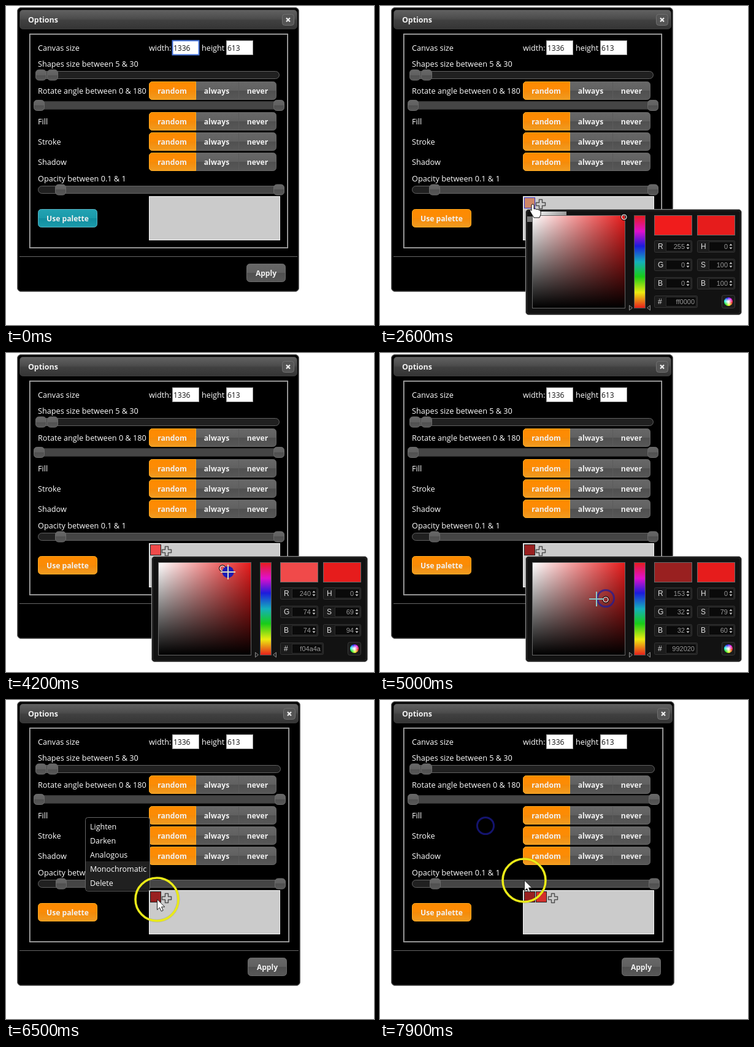
Animation, 600 px wide and 520 px high, one loop 8000 ms. Source, as an HTML page:

```html
<!DOCTYPE html>
<html lang="en">
<head>
<meta charset="utf-8">
<title>Options</title>
<style>
html, body { margin: 0; width: 600px; height: 520px; overflow: hidden; background: #fff; }
svg { display: block; }
text { font: 12.7px "Open Sans", "Noto Sans", sans-serif; fill: #fff; }
text.b { font-weight: 700; font-size: 12.1px; fill: #f2f2f2; }
text.mid { text-anchor: middle; }
text.in { font-size: 12px; fill: #111; }
text.menu { font-size: 12.5px; }
text.key { font: 12px "Liberation Sans", Arial, sans-serif; fill: #ddd; }
text.val { font: 11px "Liberation Sans", Arial, sans-serif; fill: #999; text-anchor: end; }
</style>
</head>
<body>
<svg width="600" height="520" viewBox="0 0 600 520">
  <defs id="defs"></defs>
  <g id="stage"></g>
</svg>
<script>
const LOOP = 8000, STEP = 100;
const stage = document.getElementById('stage');

// Gradients: name, horizontal?, then [offset, colour, opacity] stops
const grad = (id, horizontal, ...stops) =>
  `<linearGradient id="${id}" x1="0" y1="0" x2="${horizontal ? 1 : 0}" y2="${horizontal ? 0 : 1}">` +
  stops.map(([o, c, a = 1]) => `<stop offset="${o}" stop-color="${c}" stop-opacity="${a}"/>`).join('') +
  '</linearGradient>';
document.getElementById('defs').innerHTML =
  grad('bar', false, [0, '#626262'], [.45, '#4c4c4c'], [.55, '#404040'], [1, '#353535']) +
  grad('grey', false, [0, '#686868'], [.5, '#606060'], [.5, '#505050'], [1, '#585858']) +
  grad('orange', false, [0, '#ff8a00'], [.5, '#fb8c06'], [.5, '#f58a08'], [1, '#f19c22']) +
  grad('teal', false, [0, '#22a2b2'], [.5, '#1a9aaa'], [.5, '#108c9e'], [1, '#1c9cac']) +
  grad('white', true, [0, '#fff'], [1, '#fff', 0]) +
  grad('black', false, [0, '#000', 0], [1, '#000']) +
  grad('strip', true, [0, '#fff'], [1, '#999']) +
  grad('hue', false, [0, '#e61c1c'], [.17, '#e010cc'], [.33, '#1c1cdc'], [.5, '#14b0bc'],
    [.66, '#18cc18'], [.83, '#ecec10'], [1, '#e61c1c']) +
  `<radialGradient id="hub"><stop offset=".1" stop-color="#fff"/>
   <stop offset="1" stop-color="#fff" stop-opacity="0"/></radialGradient>`;

const rect = (x, y, w, h, fill, stroke = 'none', r = 0, extra = '') =>
  `<rect x="${x}" y="${y}" width="${w}" height="${h}" rx="${r}" fill="${fill}" stroke="${stroke}" ${extra}/>`;
const text = (x, y, s, cls = '', extra = '') => `<text x="${x}" y="${y}" class="${cls}" ${extra}>${s}</text>`;
const circle = (x, y, r, fill, stroke = 'none', w = 1, extra = '') =>
  `<circle cx="${x}" cy="${y}" r="${r}" fill="${fill}" stroke="${stroke}" stroke-width="${w}" ${extra}/>`;
const path = (d, fill, stroke = 'none', w = 1) =>
  `<path d="${d}" fill="${fill}" stroke="${stroke}" stroke-width="${w}" stroke-linejoin="round"/>`;
const at = (x, y, s) => `<g transform="translate(${x} ${y})">${s}</g>`;

// Linear interpolation in a table of [time, a, b]
function track(keys, t) {
  const i = keys.findIndex(k => k[0] > t);
  if (i === 0) return keys[0].slice(1);
  if (i < 0) return keys[keys.length - 1].slice(1);
  const [p, q] = [keys[i - 1], keys[i]], f = (t - p[0]) / (q[0] - p[0]);
  return [1, 2].map(n => p[n] + (q[n] - p[n]) * f);
}

const POINTER = [
  [300, 108, 349], [1000, 108, 349], [1300, 254, 319], [1500, 398, 338], [1800, 244, 320],
  [2300, 249, 326], [2700, 249, 326], [3000, 310, 358], [3300, 343, 362], [3700, 372, 348],
  [4200, 362, 357], [4500, 380, 385], [4900, 368, 401], [5000, 353, 401], [5500, 408, 444],
  [5800, 137, 324], [6100, 137, 324], [6400, 246, 325], [6600, 246, 325], [6800, 224, 300],
  [7200, 100, 246], [7700, 141, 204], [7800, 172, 205], [7900, 235, 294]
];
const SAT_BRI = [[3200, 100, 100], [3300, 62, 87], [3700, 80, 95], [4100, 69, 94], [4200, 69, 94],
  [4500, 86, 72], [4900, 79, 60]];
const CLICKS = [[500, 108, 349], [2000, 244, 320], [2300, 249, 326], [3300, 343, 362],
  [4200, 362, 357], [4900, 368, 400], [6000, 137, 324], [7800, 172, 205]];

function button(x, y, w, label, fill = 'grey') {
  const edge = { grey: '#6c6c6c', orange: '#ffaa20', teal: '#59b4c4' }[fill];
  return rect(x + .5, y + .5, w - 1, 29, `url(#${fill})`, edge, 5) +
    text(x + w / 2, y + 19.5, label, 'b mid');
}

function choice(y) {
  return rect(233.5, y + .5, 207, 29, 'url(#grey)', '#666', 5) +
    path(`M309.5 ${y + .5}H238.5a5 5 0 0 0-5 5v19a5 5 0 0 0 5 5h71z`, 'url(#orange)', '#ffaa20') +
    path(`M379.5 ${y + 1}v28`, 'none', '#5c5c5c') +
    text(271, y + 19.5, 'random', 'b mid') + text(343.5, y + 19.5, 'always', 'b mid') +
    text(410, y + 19.5, 'never', 'b mid');
}

function slider(y, a, b, end) {
  const knob = x => rect(x - 8.5, y - 8.5, 17, 17, 'url(#grey)', '#6a6a6a', 5);
  return rect(52.5, y - 6, end - 52, 12, '#202020', '#626262', 6) +
    rect(a, y - 5.5, b - a, 11, '#454545') + knob(a) + knob(b);
}

function dialog(t) {
  const d = t >= 6100 ? 2 : 0, end = 445 + d, on = t >= 500;
  const field = (x, s, focus) => rect(x + .5, 56.5, 43, 23, '#fff', focus ? '#4a78e0' : '#999', 0,
    `stroke-width="${focus ? 2 : 1}"`) + text(x + 2, 73, s, 'in');
  return rect(18.5, 2.5, 459 + d, 463, '#000', '#5c5c5c', 6) +
    rect(19.5, 3.5, 457 + d, 461, 'none', '#2c2c2c', 5) +
    rect(22.5, 6.5, 452 + d, 31, 'url(#bar)', '#3c3c3c', 5) +
    text(36, 27, 'Options', 'b', 'style="font-size:12.4px"') +
    rect(450.5 + d, 13.5, 19, 18, '#555', '#707070', 4) +
    path(`M${457 + d} 19.5l6 6m0-6l-6 6`, 'none', '#eee', 2.2) +
    rect(38.5, 45.5, 421 + d, 349, 'none', '#b4b4b4') +
    rect(39.5, 46.5, 419 + d, 347, 'none', '#747474') +
    text(52, 73, 'Canvas size') + text(233, 73, 'width:') + text(319, 73, 'height') +
    field(271, '1336', !on) + field(359, '613') +
    text(52, 99, 'Shapes size between 5 &amp; 30') + slider(112.5, 57, 76, end) +
    text(52, 143, 'Rotate angle between 0 &amp; 180') + slider(162, 54, end, end) +
    text(52, 193, 'Fill') + text(52, 226, 'Stroke') + text(52, 259, 'Shadow') +
    [123, 173, 206, 239].map(choice).join('') +
    text(52, 286, 'Opacity between 0.1 &amp; 1') + slider(299.5, 89 + d / 2, end, end) +
    button(52, 331, 97, 'Use palette', on ? 'orange' : 'teal') +
    rect(233.5, 310.5, 213, 71, '#cbcbcb', '#f4f4f4') +
    path(`M22 408.5h${453 + d}`, 'none', '#666') +
    button(392 + d, 420, 64, 'Apply');
}

const plus = (x, y) => at(x, y,
  path('M-2.5-7.5h5v5h5v5h-5v5h-5v-5h-5v-5h5z', '#ccc', '#505050', 1.5));

function swatches(t, color) {
  if (t < 500) return '';
  if (t < 2100) return plus(242, 319);
  const box = (x, fill, edge) => rect(x + .5, 312.5, 17, 17, fill, edge);
  const fresh = t < 2800, two = t >= 7900;
  return box(235, fresh ? '#cf8868' : color, fresh && t >= 2400 ? '#3838c8' : '#222') +
    (two ? box(254, '#d4302c', '#222') : '') + plus(two ? 282 : 262, 323);
}

function spin(x, y) {
  return path(`M${x - 2.5} ${y - 1.5}l2.5-3 2.5 3zM${x - 2.5} ${y + 1.5}l2.5 3 2.5-3z`, '#ccc');
}

function entry(x, y, key, value, wide) {
  const w = wide ? 71 : 62;
  return rect(x + .5, y - 9.5, w - 1, 19, '#1c1c1c', '#343434', 2) +
    rect(x + 19.5, y - 7.5, w - 22, 15, '#0a0a0a', '#2c2c2c') + text(x + 6, y + 4, key, 'key') +
    text(x + (wide ? 66 : 50), y + 4, value, 'val') + (wide ? '' : spin(x + 55, y));
}

function wheel(x, y, r) {
  const p = a => `${r * Math.cos(a)} ${r * Math.sin(a)}`;
  let s = '';
  for (let i = 0; i < 12; i++) {
    const a = i * Math.PI / 6;
    s += path(`M0 0L${p(a)}A${r} ${r} 0 0 1 ${p(a + Math.PI / 6)}z`, `hsl(${i * 30} 90% 52%)`);
  }
  return at(x, y, s + circle(0, 0, r, 'url(#hub)'));
}

function picker(t, sat, bri, rgb, color) {
  if (t < 2400 || t >= 6100) return '';
  const hex = rgb.map(v => v.toString(16).padStart(2, '0')).join('');
  const mx = Math.min(248 + 1.52 * sat, 398), my = Math.max(342 + 1.5 * (100 - bri), 344);
  const area = fill => rect(249, 342, 150, 150, fill);
  return `<g opacity="${t < 2500 ? .5 : 1}">` +
    rect(237.5, 331.5, 352, 172, '#101010', '#a0a0a0', 5) +
    rect(239.5, 333.5, 348, 168, '#121212', '#2c2c2c', 4) +
    (t < 2700 ? rect(248, 335, 56, 7, 'url(#strip)') + rect(240, 343, 8, 9, '#777') : '') +
    area('#e61c1c') + area('url(#white)') + area('url(#black)') +
    rect(248.5, 341.5, 151, 151, 'none', '#666') +
    circle(mx, my, 5, 'none', '#000', 1.4) + circle(mx, my, 4, 'none', '#fff', 1.2) +
    rect(414.5, 341.5, 18, 151, 'url(#hue)', '#555') +
    path('M406.5 488v8l5-4zM440.5 488v8l-5-4z', '#222', '#888') +
    rect(447.5, 341.5, 61, 32, color, '#6a6a6a') + rect(517.5, 341.5, 61, 32, '#e61c1c', '#6a6a6a') +
    ['R', 'G', 'B'].map((k, i) => entry(447, 392 + 30 * i, k, rgb[i])).join('') +
    ['H', 'S', 'B'].map((k, i) => entry(517, 392 + 30 * i, k, [0, sat, bri][i])).join('') +
    entry(447, 482, '#', hex, true) +
    rect(557.5, 471.5, 21, 21, '#1c1c1c', '#3a3a3a', 3) + wheel(568, 482, 7) + '</g>';
}

function menu(t, [x, y]) {
  if (t < 6400 || t >= 7900) return '';
  const inside = x > 129 && x < 235, hover = Math.floor((y - 195) / 23);
  return rect(129.5, 191.5, 105, 120, '#000', '#666', 4) +
    ['Lighten', 'Darken', 'Analogous', 'Monochromatic', 'Delete'].map((s, i) => {
      const lit = t < 6800 ? i > 2 : inside && i === hover;
      return (lit ? rect(130, 194 + 23 * i, 104, i === 4 ? 24 : 23, '#202020') : '') +
        text(137, 211 + 23 * i, s, 'menu');
    }).join('');
}

function pulses(t) {
  return CLICKS.map(([start, x, y]) => {
    const age = t - start;
    if (age < 0 || age > 200) return '';
    return age ? circle(x, y, 9 + age / 22, 'none', '#1c1c9c', 3, `opacity="${age > 100 ? .3 : .7}"`)
      : circle(x, y, 9.5, '#1c1cb4');
  }).join('');
}

function pointer(t, [x, y]) {
  if (t < 300) return '';
  if (t >= 2300 && t < 2800)
    return at(x, y, path('M-2-1a2 2 0 0 1 4 0v6l2-.5 2 1 2-.2 2 1.2 2 .5 1 2v5l-2 5h-9l-5-8-2-4 1.5-1 1.5 1.5z',
      '#fff', '#111'));
  if (t >= 2800 && t < 5300)
    return at(x, y, path('M-12 0h24M0-12v24', 'none', t < 4900 ? '#dcdcc0' : '#8cc8c8', 2));
  return circle(x, y, 35, 'none', '#000', 5, 'opacity=".12"') + circle(x, y, 35, 'none', '#eaea18', 3.6) +
    at(x, y, path('M.5 0v17l4-3.7 2.7 6 3-1.3-2.7-5.8h5.3z', '#fff', '#222'));
}

function draw(t) {
  const pos = track(POINTER, t);
  const [sat, bri] = track(SAT_BRI, t).map(Math.round);
  const red = Math.round(bri * 2.55), low = Math.round(red * (1 - sat / 100));
  const color = `rgb(${Math.min(red, 240)},${Math.max(low, 28)},${Math.max(low, 28)})`;
  stage.innerHTML = dialog(t) + swatches(t, color) + picker(t, sat, bri, [red, low, low], color) +
    menu(t, pos) + pulses(t) + pointer(t, pos);
}

let last = -1;
function tick() {
  const t = Math.floor(performance.now() % LOOP / STEP) * STEP;
  if (t !== last) draw(last = t);
  requestAnimationFrame(tick);
}
tick();
</script>
</body>
</html>
```
